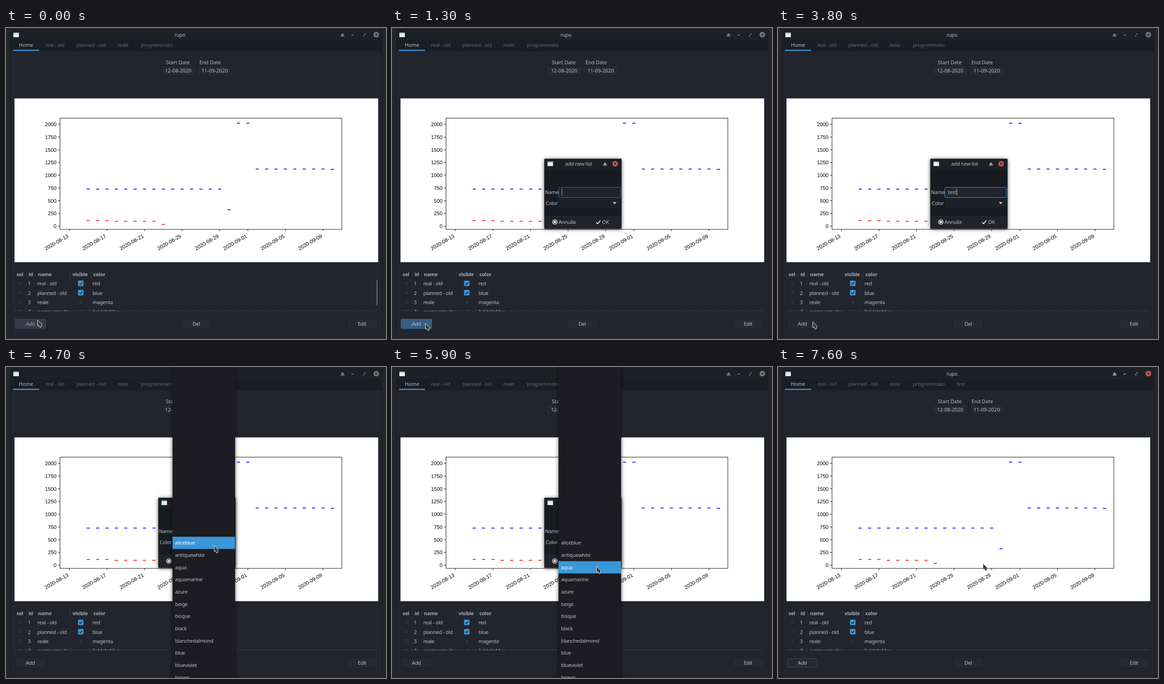
An HTML page that plays this animation: 826 px wide and 678 px high, repeating every 8 s.

```html
<!DOCTYPE html>
<html lang="en">
<head>
<meta charset="utf-8">
<title>List manager</title>
<style>
html, body { margin: 0; width: 100%; height: 100%; overflow: hidden; background: #232527; }
svg { display: block; width: 100%; height: 100%; }
text { font: 11px "Noto Sans", "Open Sans", sans-serif; letter-spacing: -.3px; fill: #b9bec6; white-space: pre; }
.wide { letter-spacing: 0; }
.bold { font-weight: 700; fill: #a4a9b1; }
.dim { fill: #60656d; }
.plot text { font: 11.3px "Liberation Sans", Arial, sans-serif; letter-spacing: 0; fill: #000; }
.mid { text-anchor: middle; }
.end { text-anchor: end; }
</style>
</head>
<body>
<svg id="stage" viewBox="0 0 826 678" xmlns="http://www.w3.org/2000/svg"></svg>
<script>
const BLUE = '#3a97d8', INK = '#b9bec6';
const LOOP = 8000, STEP = 100;

const rect = (x, y, w, h, fill, more = '') =>
  `<rect x="${x}" y="${y}" width="${w}" height="${h}" fill="${fill}" ${more}/>`;
const text = (x, y, s, cls = '', more = '') =>
  `<text x="${x}" y="${y}" class="${cls}" ${more}>${s}</text>`;
const path = (d, stroke, width = 1, more = '') =>
  `<path d="${d}" fill="none" stroke="${stroke}" stroke-width="${width}" ${more}/>`;
const group = (id, body, more = '') => `<g id="${id}" ${more}>${body}</g>`;
const times = (n, fn) => Array.from({ length: n }, (_, i) => fn(i)).join('');

const windowIcon = (x, y) =>
  rect(x, y, 12, 10, '#e9edf0') + rect(x, y, 12, 2.5, '#a9c2d4');
const eject = (x, y) =>
  `<path d="M${x - 4} ${y + 1}L${x} ${y - 3.5}L${x + 4} ${y + 1}ZM${x - 4} ${y + 2}h8v1.5h-8Z" fill="${INK}"/>`;
const closeButton = (x, y, fill) =>
  `<circle cx="${x}" cy="${y}" r="6" fill="${fill}"/>` +
  path(`M${x - 2.3} ${y - 2.3}l4.6 4.6m0 -4.6l-4.6 4.6`, '#1c2225', 1.4);
const button = (x, y, w, h, label, cls = 'mid') =>
  rect(x + .5, y + .5, w - 1, h - 1, '#262932', 'rx="2" stroke="#1b1e25"') +
  text(x + w / 2, y + h / 2 + 4, label, cls);

function checkbox(x, y, on) {
  return on
    ? rect(x - .5, y - .5, 12, 12, BLUE, 'rx="2"') + path(`M${x + 2.5} ${y + 5.5}l2.3 2.5l4 -4.8`, '#1f222a', 1.7)
    : rect(x + .5, y + .5, 10, 10, '#2a2c33', 'rx="1.5" stroke="#1a1c22"');
}

function frame() {
  const tabs = [[85, 'real - old'], [153, 'planned - old'], [242, 'reale'], [293, 'programmato']];
  return rect(0, 0, 826, 678, '#232527') +
    rect(9, 3, 809, 670, '#181a20', 'rx="3"') +
    rect(10, 4, 807, 23, '#1b2224', 'rx="2"') +
    rect(10, 26, 807, 24.5, '#1a1d24') +
    rect(10, 50.5, 807, 621.5, '#22252e') +
    windowIcon(16, 10) + text(378, 19, 'rupo', 'mid') +
    group('controls', eject(731.5, 15) +
      path('M751 15.5h5M777 17.5v-2m0 2h2M781 12.5v2m0 -2h-2', INK, 1.4)) +
    closeButton(805, 14.5, '#777c7e') +
    group('focusedClose', closeButton(805, 14.5, '#d4545a')) +
    text(28, 41, 'Home', 'wide') + rect(15, 47.5, 57, 2.5, BLUE) +
    tabs.map(([x, s]) => text(x, 41, s, 'dim')).join('') +
    text(388, 41, 'test', 'dim', 'id="newTab"') +
    text(373.5, 78.5, 'Start Date', 'mid wide') + text(444, 78.5, 'End Date', 'mid wide') +
    button(335, 82, 78.5, 22, '12-08-2020', 'mid wide') +
    button(414.5, 82, 78.5, 22, '11-09-2020', 'mid wide');
}

function chart() {
  const dayX = d => 117.4 + 20.417 * d;
  const valueY = v => 432 - v * .111;
  const marks = (from, to, y, color) =>
    times(to - from + 1, i => path(`M${dayX(from + i) - 3.4} ${y}h6.8`, color, 1.7));
  const dates = [[1, '08-13'], [5, '08-17'], [9, '08-21'], [13, '08-25'], [17, '08-29'],
    [20, '09-01'], [24, '09-05'], [28, '09-09']];
  return `<g class="plot">` + rect(18.5, 153.5, 790.5, 357, '#fff') +
    rect(117.4, 196.5, 612.6, 242.5, 'none', 'stroke="#000" stroke-width=".95"') +
    times(9, i => path(`M117 ${valueY(i * 250)}h-3.8`, '#000') +
      text(109.8, valueY(i * 250) + 4, i * 250, 'end')) +
    dates.map(([d, s]) => path(`M${dayX(d)} 439v3.8`, '#000') +
      text(0, 0, '2020-' + s, 'end', `transform="translate(${dayX(d) - 1} 456) rotate(-30)"`)).join('') +
    marks(3, 17, 351.2, '#00f') + marks(18, 18, 396.2, '#00f') + marks(19, 20, 207.5, '#00f') +
    marks(21, 28, 307.5, '#00f') + marks(29, 29, 308.2, '#00f') +
    marks(3, 5, 419.6, '#f00') + marks(6, 10, 421.5, '#f00') + marks(11, 11, 428.3, '#f00') + '</g>';
}

function table() {
  const heads = [[23, 'sel'], [49, 'id'], [69.5, 'name'], [144.5, 'visible'], [190, 'color']];
  const rows = [['real - old', 'red', 1], ['planned - old', 'blue', 1], ['reale', 'magenta', 0], ['programmato', 'lightskyblue', 0]];
  return heads.map(([x, s]) => text(x, 541, s, 'bold')).join('') +
    path('M44.5 531v14M64.5 531v14M139.5 531v14M185.5 531v14', '#3a3d46') +
    '<clipPath id="rows"><path d="M10 547h800v70.5h-800z"/></clipPath><g clip-path="url(#rows)">' +
    rows.map(([name, color, on], i) => {
      const y = 561.3 + i * 20.2;
      return checkbox(26, y - 10, 0) + text(47.5, y, i + 1) + text(68, y, name) +
        checkbox(157, y - 10, on) + text(188, y, color);
    }).join('') + '</g>' +
    path('M19 616.5h788', '#4c5058', 1, 'stroke-dasharray="4 3"') +
    rect(805, 549, 3, 56, '#555962', 'rx="1.5" id="scrollbar"');
}

function buttons() {
  return button(19, 634, 68, 22, '') +
    rect(19, 634, 68, 22, '#383c49', 'rx="2" id="addHover"') +
    rect(19, 634, 68, 22, BLUE, 'rx="2" id="addPress"') +
    rect(20.5, 635.5, 65, 19, 'none', 'stroke="#6a6f78" stroke-dasharray="1 1" id="addFocus"') +
    text(53, 649, 'Add', 'mid', 'id="addText"') +
    button(379.5, 634, 68, 22, 'Del') + button(740, 634, 68, 22, 'Edit');
}

function dialog() {
  return rect(331, 285, 168, 152.5, '#191c23', 'rx="2" filter="url(#shadow)"') +
    rect(331, 285, 168, 24, '#1a2123', 'rx="2"') +
    windowIcon(338, 291) + text(405.5, 300, 'add new list', 'mid') +
    eject(463, 296.5) + closeButton(485, 296, '#d4545a') +
    text(332.5, 362, 'Name') + text(334, 386, 'Color') +
    rect(363.5, 348, 133, 21, '#1d2028') +
    rect(362.5, 347.5, 134.5, 22, '#20242c', `rx="2.5" stroke="${BLUE}" id="entryFocus"`) +
    text(369.5, 362, '', '', 'id="entry"') + rect(369, 350, 1, 15, '#c8ccd2', 'id="caret"') +
    rect(363.5, 371, 133, 21, '#1e2129') +
    rect(363.5, 371, 133, 21, '#343a48', 'rx="2" id="comboHover"') +
    rect(364.5, 371.5, 131, 20, 'none', 'stroke="#62676f" stroke-dasharray="1 1" id="comboFocus"') +
    text(371, 386, '', '', 'id="combo"') +
    `<path d="M479.5 379.5h9l-4.5 4.7z" fill="${INK}"/>` +
    rect(331, 409, 168, 28.5, '#20232b') +
    rect(415.5, 409, 83.5, 28.5, '#262a33', 'id="okHover"') +
    rect(415.5, 409, 83.5, 28.5, BLUE, 'id="okPress"') +
    '<circle cx="354" cy="423" r="5" fill="none" stroke="#dfe2e5" stroke-width="1.5"/><circle cx="354" cy="423" r="3" fill="#dfe2e5"/>' +
    text(362, 427, 'Annulla') +
    path('M444 423.5l3 3.2l6 -7', '#dfe2e5', 2) + text(456.5, 427, 'OK', 'wide', 'id="okText"');
}

const ROW = 26.67;
const COLORS = ['aliceblue', 'antiquewhite', 'aqua', 'aquamarine', 'azure', 'beige', 'bisque', 'black',
  'blanchedalmond', 'blue', 'blueviolet', 'brown'];

function popup() {
  return rect(362, -10, 136, 698, '#1a1d24', 'filter="url(#shadow)"') +
    rect(362, 370, 136, ROW, BLUE, 'id="choice"') +
    COLORS.map((s, i) => text(367.5, 387.4 + i * ROW, s, '', 'data-item')).join('');
}

const stage = document.getElementById('stage');
stage.innerHTML =
  '<filter id="shadow" x="-20%" y="-20%" width="140%" height="140%"><feDropShadow dx="0" dy="1" stdDeviation="4" flood-opacity=".65"/></filter>' +
  frame() + chart() + table() + buttons() + group('dialog', dialog()) + group('popup', popup()) +
  group('cursor', '<path d="M.5 .5V13.2L3.6 12.2L5.2 16.2H8.2L9.8 9.6Z" fill="#3a3c40" stroke="#e4e6e8" stroke-width="1" stroke-linejoin="round"/>');

const el = {};
stage.querySelectorAll('[id]').forEach(node => el[node.id] = node);
const items = [...stage.querySelectorAll('[data-item]')];

const alpha = (name, value) => el[name].setAttribute('opacity', +value);
const between = (t, a, b) => t >= a && t < b;
const ramp = (t, a, b) => Math.min(1, Math.max(0, (t - a) / (b - a)));
const ease = k => k * k * (3 - 2 * k);

// Each stop: start, end, x, y; the pointer rests between stops.
const moves = [[100, 600, 72, 643], [3700, 3800, 75, 640], [3800, 4400, 452, 389],
  [5600, 5900, 444, 434], [6900, 7000, 445, 428]];

function pointer(t) {
  let x = 68, y = 636;
  for (const [a, b, toX, toY] of moves) {
    const k = ease(ramp(t, a, b));
    x += (toX - x) * k;
    y += (toY - y) * k;
  }
  return [x, y];
}

function render(t) {
  const [x, y] = pointer(t);
  el.cursor.setAttribute('transform', `translate(${x.toFixed(1)} ${y.toFixed(1)})`);

  const focused = between(t, 1000, 1300) || t >= 7500;
  alpha('focusedClose', focused);
  alpha('controls', focused ? 1 : .72);
  alpha('newTab', t >= 7500);
  alpha('addFocus', t >= 7500);
  alpha('scrollbar', 1 - ramp(t, 100, 600));

  alpha('addHover', 1 - ramp(t, 1200, 1500));
  alpha('addPress', t < 1200 ? ramp(t, 900, 1100) : .42 * (1 - ramp(t, 1300, 1500)) + (t < 1300 ? .3 : 0));
  el.addText.style.fill = t < 1000 ? '#969ba4' : INK;

  alpha('dialog', between(t, 1300, 7500));
  const typed = [2400, 2800, 2900, 3300].filter(at => t >= at).length;
  const editing = t < 4600;
  el.entry.textContent = 'test'.slice(0, typed);
  alpha('entryFocus', editing ? .6 + .4 * ramp(t, 1200, 1500) : 0);
  alpha('caret', editing && !between(t, 2000, 2400));
  el.caret.setAttribute('x', 369 + [0, 4, 10, 15.5, 19.5][typed]);

  const open = between(t, 4600, 4900) || between(t, 5300, 6300);
  const hover = between(t, 4400, 6300);
  alpha('comboHover', hover ? 1 : ramp(t, 4200, 4400) * (t < 4400));
  alpha('comboFocus', t >= 4600);
  el.combo.textContent = t < 4900 ? '' : t < 6300 ? 'aliceblue' : 'aqua';
  el.combo.style.fill = hover ? '#8b919b' : INK;

  const okHover = ramp(t, 6200, 6500);
  alpha('okHover', okHover);
  alpha('okPress', ramp(t, 7200, 7400));
  el.okText.style.fill = t >= 6300 && t < 7300 ? '#8b919b' : INK;

  alpha('popup', open);
  const row = Math.max(0, Math.floor((y - 370) / ROW));
  el.choice.setAttribute('y', 370 + row * ROW);
  items.forEach((item, i) => item.style.fill = i === row ? '#fff' : INK);
}

const start = performance.now();
function tick() {
  const t = (performance.now() - start) % LOOP;
  render(Math.floor(t / STEP) * STEP);
  requestAnimationFrame(tick);
}
tick();
</script>
</body>
</html>
```
